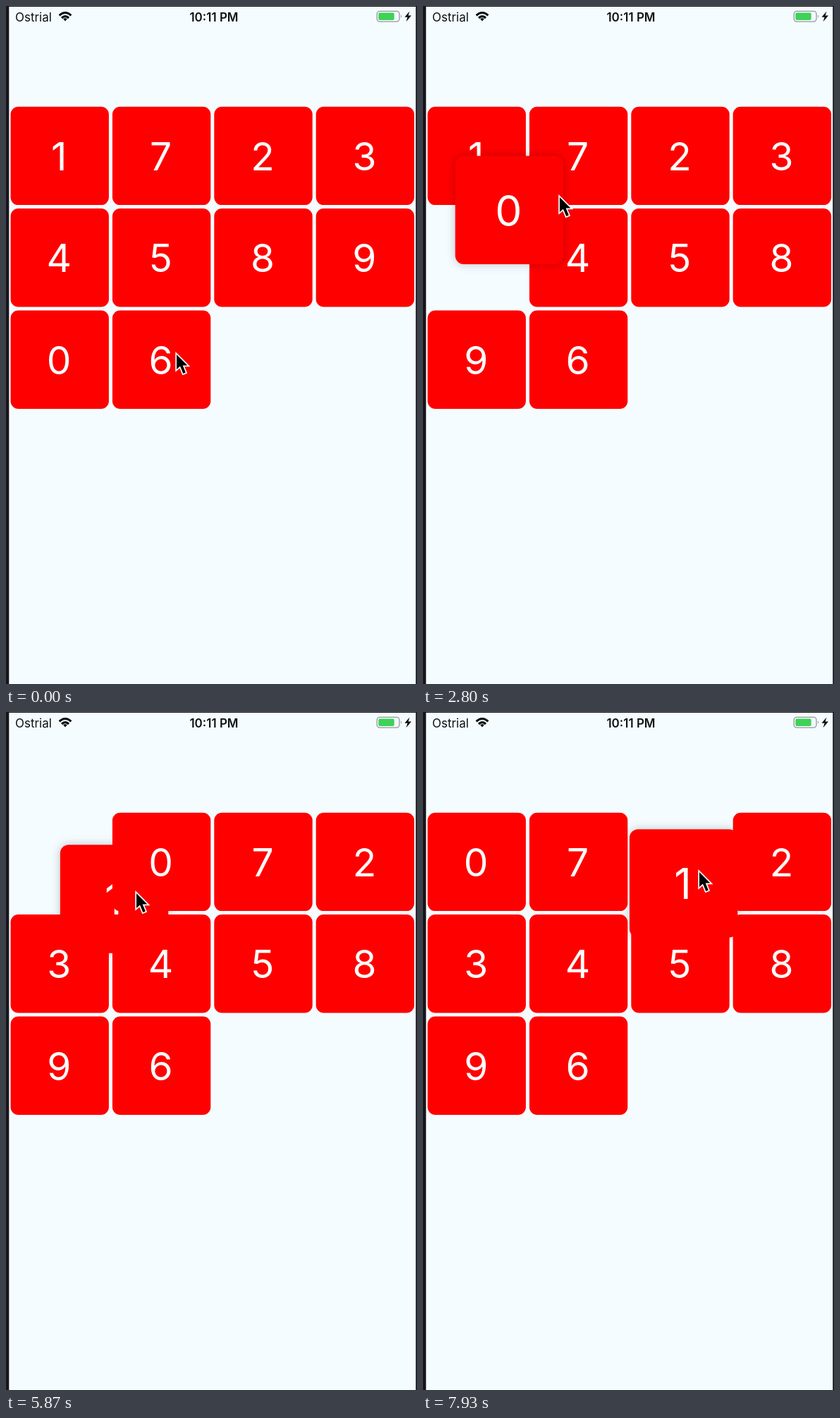
These frames come from a looping animation (583 by 961 pixels, 8000 ms). An HTML page:

```html
<!DOCTYPE html>
<html lang="en">
<head>
<meta charset="utf-8">
<title>Draggable grid</title>
<style>
  html, body { margin: 0; width: 100%; height: 100%; overflow: hidden; background: #f5fcff; }
  svg { display: block; }
  text { font-family: Inter, Roboto, sans-serif; }
  .tile rect { fill: #f00; }
  .tile text { fill: #fff; font-size: 55px; text-anchor: middle; }
  .bar { font-size: 17px; fill: #111; }
</style>
</head>
<body>
<svg width="583" height="961" viewBox="0 0 583 961">
  <rect width="583" height="961" fill="#f5fcff"/>
  <path d="M0 0H583V961H581.3V1H4.3V961H0Z" fill="#18151a"/>
  <text class="bar" x="13" y="21.5">Ostrial</text>
  <g fill="none" stroke="#0a0a0a" stroke-width="3.1">
    <path d="M75.6 13.3Q84 5.7 92.4 13.3"/>
    <path d="M79 17Q84 12.4 89 17"/>
    <path d="M81.2 18.3Q84 16.2 86.8 18.3L84 21.6Z" fill="#0a0a0a" stroke="none"/>
  </g>
  <text class="bar" x="295" y="21.5" font-weight="600" text-anchor="middle">10:11 PM</text>
  <rect x="526.2" y="7.3" width="31.8" height="14.8" rx="4" fill="none" stroke="#92979a" stroke-width="1.3"/>
  <rect x="528.3" y="9.4" width="22.4" height="10.6" rx="2" fill="#3fd158"/>
  <path d="M560 12.3Q562 14.7 560 17.1Z" fill="#92979a"/>
  <path d="M572.5 7.5L565.5 15.8H569.6L567.6 22.2L575 13.4H570.6Z" fill="#0a0a0a"/>
  <g id="tiles"></g>
  <path id="cursor" d="M1 3V24L6 19.6L10.3 30L13.9 28.5L9.7 18.5H16.4Z"
    fill="#000" stroke="#fff" stroke-width="3.4" paint-order="stroke"/>
</svg>
<script>
// Time runs in ticks of 1/15 s
const TICKS = 120, SHIFT = 3, LIFT = 2, REACH = 55;

// Key points of the pointer: tick, x, y
const path = [
  [0, 241, 491], [12, 124, 490], [15, 124, 490], [23, 115, 507], [32, 115, 507],
  [39, 122, 350], [44, 230, 240], [51, 190, 246], [56, 190, 246], [69, 96, 194],
  [83, 96, 194], [87, 173.5, 247], [88, 184, 254], [94, 425, 325], [97, 331.5, 393],
  [98, 277, 438], [106, 102, 500], [110, 147, 469], [111, 172, 426], [115, 372, 238],
  [119, 391, 224]
];

// Each drag: tile, press and release ticks, grip point relative to the tile's centre
const drags = [
  { tile: 0, from: 30, to: 56, grip: [39, 6] },
  { tile: 1, from: 81, to: Infinity, grip: [20, -18] }
];

const startOrder = [1, 7, 2, 3, 4, 5, 8, 9, 0, 6];

const clamp = v => Math.min(1, Math.max(0, v));
const ease = v => { v = clamp(v); return v * v * (3 - 2 * v); };
const mix = (a, b, k) => a.map((v, i) => v + (b[i] - v) * k);
const slotAt = n => [76.2 + n % 4 * 144.4, 212.4 + Math.floor(n / 4) * 144.4];

const slope = (i, c) => (path[i + 1][c] - path[i][c]) / (path[i + 1][0] - path[i][0]);
function tangent(i, c) {
  if (i === 0 || i === path.length - 1) return 0;
  const a = slope(i - 1, c), b = slope(i, c);
  return a * b > 0 ? 2 * a * b / (a + b) : 0;
}

// Monotone cubic through the key points
function pointer(t) {
  let i = 0;
  while (i < path.length - 2 && t >= path[i + 1][0]) i++;
  const h = path[i + 1][0] - path[i][0], u = (t - path[i][0]) / h, w = 1 - u;
  return [1, 2].map(c =>
    path[i][c] * (1 + 2 * u) * w * w + path[i + 1][c] * u * u * (3 - 2 * u) +
    h * u * w * (tangent(i, c) * w - tangent(i + 1, c) * u));
}

// A held tile trails the pointer by one tick
function held(drag, t) {
  const [x, y] = pointer(Math.min(t, drag.to) - 1);
  return [x - drag.grip[0], y - drag.grip[1]];
}

// A held tile takes over any slot it comes close to; the others close up
const reorders = [];
let order = startOrder;
for (let t = 0; t < TICKS; t++) {
  const drag = drags.find(d => t >= d.from && t < d.to);
  if (!drag) continue;
  const [x, y] = held(drag, t);
  const slot = order.findIndex((_, n) => {
    const [sx, sy] = slotAt(n);
    return Math.hypot(x - sx, y - sy) < REACH;
  });
  if (slot < 0 || order[slot] === drag.tile) continue;
  order = order.filter(n => n !== drag.tile);
  order.splice(slot, 0, drag.tile);
  reorders.push({ at: t, order });
}

function gridPos(tile, t) {
  return reorders.reduce(
    (pos, r) => mix(pos, slotAt(r.order.indexOf(tile)), ease((t - r.at) / SHIFT)),
    slotAt(startOrder.indexOf(tile)));
}

function pose(tile, t) {
  const home = gridPos(tile, t), drag = drags.find(d => d.tile === tile);
  if (!drag || t < drag.from) return { pos: home, lift: 0 };
  const drop = ease((t - drag.to) / SHIFT);
  return { pos: mix(held(drag, t), home, drop), lift: ease((t - drag.from) / LIFT) * (1 - drop) };
}

const layer = document.getElementById("tiles");
const cursor = document.getElementById("cursor");

// Stacking: 1 lies lowest, 0 on top
const tiles = Array.from({ length: 10 }, (_, i) => {
  const n = (i + 1) % 10;
  const g = document.createElementNS("http://www.w3.org/2000/svg", "g");
  g.setAttribute("class", "tile");
  g.innerHTML = `<rect x="-69.7" y="-69.7" width="139.4" height="139.4" rx="11"/><text x="-1" y="20.4">${n}</text>`;
  layer.append(g);
  return { n, g, box: g.firstChild };
});

function draw(ms) {
  // Small bias keeps times rounded to 10 ms on their own tick
  const t = Math.floor((ms + 4) * 15 / 1000) % TICKS;
  for (const { n, g, box } of tiles) {
    const { pos, lift } = pose(n, t);
    g.setAttribute("transform", `translate(${pos}) scale(${1 + 0.1 * lift})`);
    box.style.filter = lift ? `drop-shadow(0 0 6px rgba(0,0,0,${0.22 * lift}))` : "none";
  }
  cursor.setAttribute("transform", `translate(${pointer(t)})`);
}

const start = performance.now();
function tick() {
  draw(performance.now() - start);
  requestAnimationFrame(tick);
}
tick();
</script>
</body>
</html>
```
